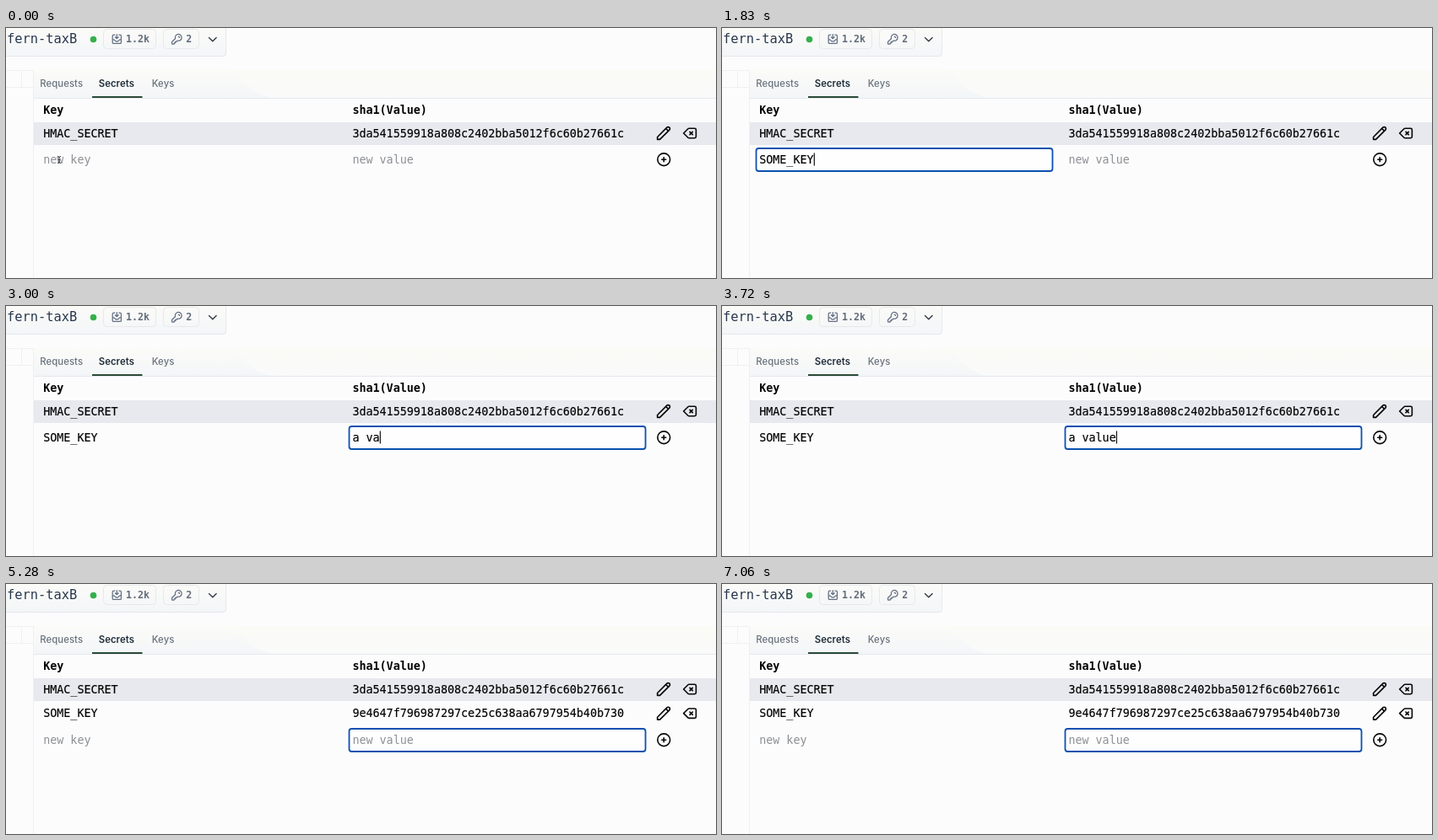
These frames come from a looping animation (841x297 px, 7120 ms). An HTML page:

```html
<!DOCTYPE html>
<html lang="en">
<head>
<meta charset="utf-8">
<title>Adding a secret</title>
<style>
  html, body { margin: 0; width: 100%; height: 100%; overflow: hidden; background: #fcfcfd; }
  svg { display: block; width: 841px; height: 297px; }
  text { font: 13.37px "DejaVu Sans Mono", monospace; fill: #000; stroke: #000; stroke-width: .15; white-space: pre; }
  .bold { font-weight: 700; stroke: none; }
  .title { font-size: 15.35px; fill: #27364b; stroke: none; }
  .count { font-size: 11.6px; font-weight: 700; fill: #646d7b; stroke: none; }
  .tab { font: 500 11.3px Inter, sans-serif; letter-spacing: .1px; fill: #69727d; stroke: none; }
  .tab.on { font-weight: 600; fill: #1f2d3a; }
  .hint { fill: #8d9094; stroke: none; }
  .icon { fill: none; stroke: #080808; stroke-width: 2; stroke-linecap: round; stroke-linejoin: round; }
  .soft { stroke: #647083; }
  .edge { fill: none; stroke: #e6e8ec; }
</style>
</head>
<body>
<svg viewBox="0 0 841 297">
  <defs>
    <linearGradient id="bar" x2="0" y2="1">
      <stop stop-color="#fbfbf8"/><stop offset="1" stop-color="#f3f6f8"/>
    </linearGradient>
    <linearGradient id="strip" x2="0" y2="1">
      <stop stop-color="#fbfbf6"/><stop offset="1" stop-color="#f9fafa"/>
    </linearGradient>
    <g id="pencil" class="icon" transform="scale(.82) translate(-12 -12)">
      <path d="M15.2 5.2l3.6 3.6M16.7 3.7a2.5 2.5 0 1 1 3.6 3.6L6.500 21H3v-3.500Z"/>
    </g>
    <g id="erase" class="icon" transform="scale(.82) translate(-12 -12)">
      <path d="M12 10l4 4M16 10l-4 4M3 12l6.400 6.400a2 2 0 0 0 1.400.6H19a2 2 0 0 0 2-2V7a2 2 0 0 0-2-2h-8.200a2 2 0 0 0-1.400.6Z"/>
    </g>
    <g id="tools">
      <use href="#pencil" x="779"/>
      <use href="#erase" x="810"/>
    </g>
  </defs>

  <!-- top bar -->
  <path d="M0 0H261V30q0 4-4 4H0Z" fill="url(#bar)"/>
  <path class="edge" d="M0 33.5H257q3.5 0 3.5-3.5V0"/>
  <text class="title" x="1" y="17.7">fern-taxB</text>
  <circle cx="103.5" cy="13.5" r="3.8" fill="#35b04b"/>
  <rect class="edge" x="115.5" y="1.5" width="62" height="23" rx="4"/>
  <rect class="edge" x="186.5" y="1.5" width="42" height="23" rx="4"/>
  <g class="icon soft" transform="translate(131.3 13.3) scale(.64) translate(-12 -12)">
    <path d="M8 4H6a2 2 0 0 0-2 2v12a2 2 0 0 0 2 2h12a2 2 0 0 0 2-2V6a2 2 0 0 0-2-2h-2M12 3v8M9 8l3 3 3-3M4 13h2.600l.7.3 2.400 2.400.7.3h3.200l.7-.3 2.400-2.400.7-.3H20"/>
  </g>
  <text class="count" x="142" y="17.3">1.2k</text>
  <g class="icon soft" transform="translate(202.3 13.3) scale(.64) translate(-12 -12)">
    <path d="M15 7a2 2 0 0 1 2 2M21 9a6 6 0 0 1-7.700 5.700L11 17H9v2H7v2H4a1 1 0 0 1-1-1v-2.600l.3-.7 6-6A6 6 0 1 1 21 9Z"/>
  </g>
  <text class="count" x="213.3" y="17.3">2</text>
  <path class="icon" d="M240.5 11.500l4.300 4.300 4.300-4.300" style="stroke:#333b46;stroke-width:1.4"/>

  <!-- tabs -->
  <rect x="33" y="50" width="808" height="33" fill="url(#strip)"/>
  <path d="M33 50.5H258C282 50.5 284 83 322 83H33Z" fill="url(#bar)"/>
  <path class="edge" d="M0 50.5H33M18.5 50V70.5M0 70.5H33M32.5 50V297" style="stroke:#f0f1ed"/>
  <path class="edge" d="M33 83.5H841"/>
  <text class="tab" x="40.2" y="70.3">Requests</text>
  <text class="tab on" x="109.7" y="70.3">Secrets</text>
  <text class="tab" x="172.7" y="70.3">Keys</text>
  <rect x="102" y="81" width="59.5" height="2" fill="#2a4a38"/>

  <!-- table -->
  <rect x="33" y="112" width="808" height="27" fill="#e8e9ee"/>
  <text class="bold" x="44.2" y="102">Key</text>
  <text class="bold" x="410.4" y="102">sha1(Value)</text>
  <text x="44.2" y="129.5">HMAC_SECRET</text>
  <text x="410.4" y="129.5">3da541559918a808c2402bba5012f6c60b27661c</text>
  <use href="#tools" y="125"/>
  <g id="saved">
    <text x="44.2" y="158.3">SOME_KEY</text>
    <text x="410.4" y="158.3">9e4647f796987297ce25c638aa6797954b40b730</text>
    <use href="#tools" y="153.7"/>
  </g>

  <!-- entry row, centred on y = 0 -->
  <g id="entry">
    <rect id="box" y="-13" width="351" height="27" rx="3" fill="#fefefe" stroke="#0c50b0" stroke-width="1.8"/>
    <text id="key" x="44.2" y="5"></text>
    <text id="value" x="410.4" y="5"></text>
    <rect id="caret" y="-7.5" width="1.2" height="15" fill="#111"/>
    <g class="icon" transform="translate(779.2 .2) scale(.82) translate(-12 -12)">
      <circle cx="12" cy="12" r="9"/><path d="M9 12h6M12 9v6"/>
    </g>
  </g>
  <path id="mouse" d="M61 152.5q2 0 2 1.5v5q0 1.5-2 1.5M65 152.5q-2 0-2 1.5M65 160.5q-2 0-2-1.5M62 156.5h2" fill="none" stroke="#333"/>
</svg>
<script>
  const LOOP = 7120, FOCUS = 420, TAB = 2380, SUBMIT = 4900, CHAR = 8.05;
  const keyTimes = [640, 760, 880, 1000, 1240, 1420, 1540, 1660];
  const valueTimes = [2620, 2740, 2840, 2950, 3100, 3230, 3350];
  const events = [FOCUS, ...keyTimes, TAB, ...valueTimes];
  const el = id => document.getElementById(id);
  const show = (id, on) => el(id).style.display = on ? "" : "none";
  const typed = (text, times, t) => text.slice(0, times.filter(k => k <= t).length);

  function fill(id, text, hint) {
    el(id).textContent = text || hint;
    el(id).classList.toggle("hint", !text);
  }

  function draw(t) {
    const saved = t >= SUBMIT, onValue = t >= TAB, focused = t >= FOCUS;
    const key = saved ? "" : typed("SOME_KEY", keyTimes, t);
    const value = saved ? "" : typed("a value", valueTimes, t);
    fill("key", key, "new key");
    fill("value", value, "new value");
    show("saved", saved);
    el("entry").setAttribute("transform", `translate(0 ${saved ? 185 : 156})`);

    show("box", focused);
    el("box").setAttribute("x", onValue ? 406.5 : 40.5);

    // the caret restarts its blink with each keystroke
    const last = Math.max(0, ...events.filter(e => e <= t));
    show("caret", focused && (t - last) % 1000 < 500);
    el("caret").setAttribute("x", onValue ? 410.5 + value.length * CHAR : 44.3 + key.length * CHAR);
    show("mouse", t < keyTimes[0]);
  }

  const start = performance.now();
  function tick() {
    draw((performance.now() - start) % LOOP);
    requestAnimationFrame(tick);
  }
  tick();
</script>
</body>
</html>
```
